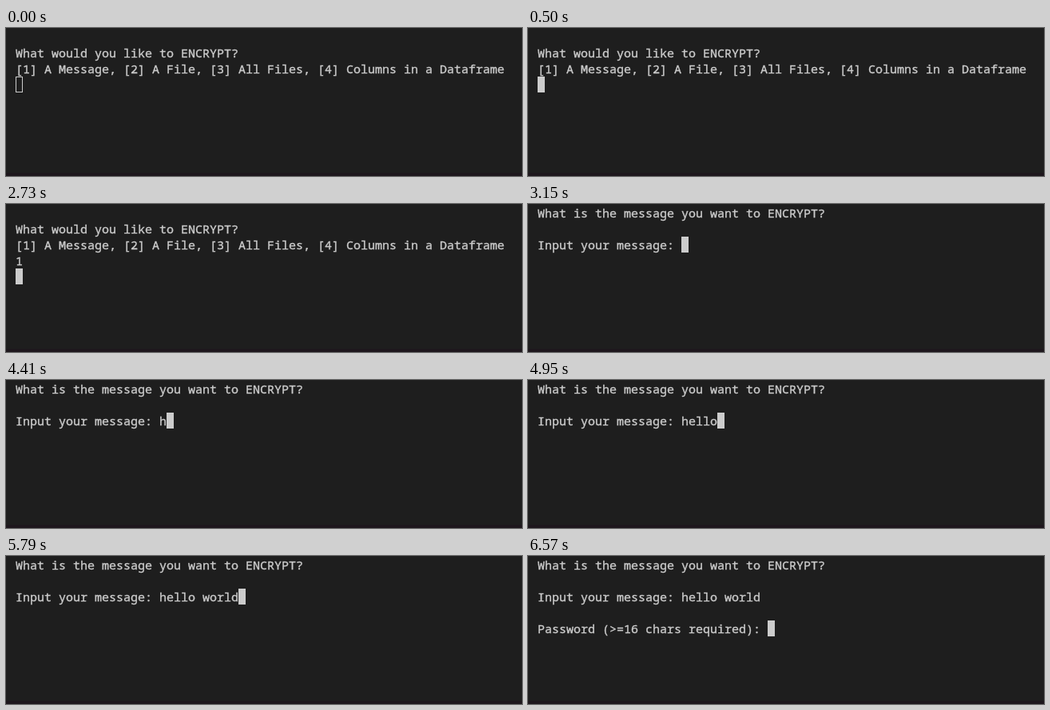
An HTML page for the animation above (8000 ms loop, 646 by 186 pixels).

```html
<!DOCTYPE html>
<html lang="en">
<head>
<meta charset="utf-8">
<title>Terminal session</title>
<style>
  html, body { margin: 0; width: 100%; height: 100%; overflow: hidden; background: #1e1e1e; }
  svg { display: block; width: 646px; height: 186px; }
  text {
    font: 15px "Noto Sans Mono", "DejaVu Sans Mono", monospace;
    font-variant-ligatures: none;
    white-space: pre;
    fill: #cccccc;
    stroke: #cccccc;
    stroke-width: 0.35px;
  }
</style>
</head>
<body>
<svg viewBox="0 0 646 186">
  <rect width="646" height="186" fill="#1e1e1e"/>
  <rect y="182" width="646" height="4" fill="#1e171d"/>
  <rect id="cursor" stroke="#cccccc" stroke-width="1" width="8" height="19"/>
  <g id="lines"></g>
</svg>
<script>
const LOOP = 8000;
const LEFT = 12, TOP = 1, CELL = 9, ROW = 20, BASELINE = 16;

const menu = [
  "",
  "What would you like to ENCRYPT?",
  "[1] A Message, [2] A File, [3] All Files, [4] Columns in a Dataframe",
];
const prompt = ["What is the message you want to ENCRYPT?", ""];
const ask = "Input your message: ";
const message = "hello world";

// The cursor always sits at the end of the last line.
const steps = [
  { at: 0, lines: [...menu, ""], hollow: true },
  { at: 500, lines: [...menu, ""] },
  { at: 2310, lines: [...menu, "1"] },
  { at: 2730, lines: [...menu, "1", ""] },
  { at: 3150, lines: [...prompt, ask] },
];
const keyTimes = [4410, 4470, 4650, 4770, 4950, 5130, 5310, 5430, 5550, 5670, 5790];
keyTimes.forEach((at, i) =>
  steps.push({ at, lines: [...prompt, ask + message.slice(0, i + 1)] }));
steps.push({
  at: 6570,
  lines: [...prompt, ask + message, "", "Password (>=16 chars required): "],
});

const group = document.getElementById("lines");
const cursor = document.getElementById("cursor");
const rows = Array.from({ length: 5 }, (_, i) => {
  const row = document.createElementNS("http://www.w3.org/2000/svg", "text");
  row.setAttribute("x", LEFT);
  row.setAttribute("y", TOP + i * ROW + BASELINE);
  return group.appendChild(row);
});

let shown = null;

function show(step) {
  if (step === shown) return;
  shown = step;
  rows.forEach((row, i) => { row.textContent = step.lines[i] || ""; });
  const last = step.lines.length - 1;
  cursor.setAttribute("x", LEFT + step.lines[last].length * CELL + 0.5);
  cursor.setAttribute("y", TOP + last * ROW + 0.5);
  cursor.setAttribute("fill", step.hollow ? "none" : "#cccccc");
}

const start = performance.now();

function tick() {
  const time = (performance.now() - start) % LOOP;
  show(steps.findLast(step => step.at <= time));
  requestAnimationFrame(tick);
}
tick();
</script>
</body>
</html>
```
